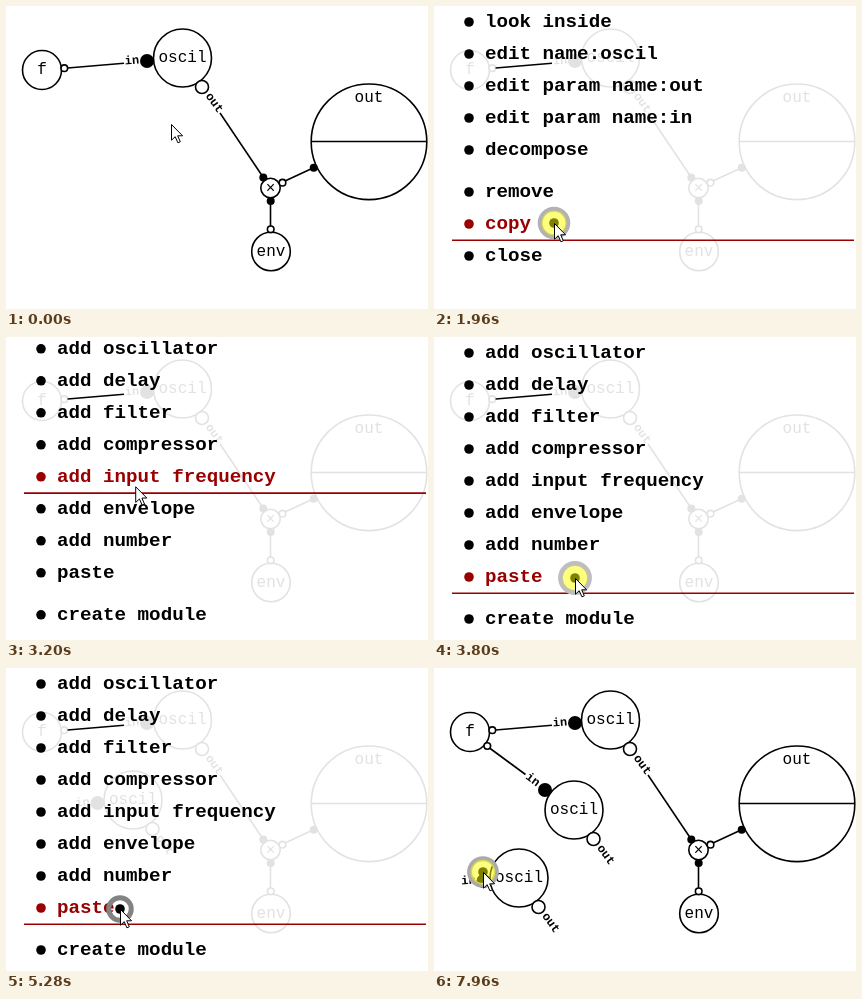
These frames come from a looping animation (422x303 px, 8000 ms). An HTML page:

```html
<!DOCTYPE html>
<html lang="en">
<head>
<meta charset="utf-8">
<title>Patch editor</title>
<style>
html, body { margin: 0; width: 100%; height: 100%; overflow: hidden; background: #fff; }
svg { display: block; width: 100%; height: 100%; font-family: "Courier New", "Liberation Mono", monospace; }
.shape { stroke: #000; stroke-width: 1.6; fill: #fff; }
.dot { fill: #000; }
.label { font-size: 16px; text-anchor: middle; }
.small { font-size: 12px; font-weight: bold; text-anchor: middle; }
.item { font-size: 19.2px; font-weight: bold; }
</style>
</head>
<body>
<svg id="stage" viewBox="0 0 422 303"></svg>
<script>
const LOOP = 8000;
const stage = document.getElementById('stage');

function add(parent, tag, attrs = {}, text) {
  const el = document.createElementNS('http://www.w3.org/2000/svg', tag);
  for (const key in attrs) el.setAttribute(key, attrs[key]);
  if (text) el.textContent = text;
  parent.appendChild(el);
  return el;
}
const group = parent => add(parent, 'g');
const circle = (p, cx, cy, r, cls = 'shape') => add(p, 'circle', { cx, cy, r, class: cls });
const line = (p, x1, y1, x2, y2) => add(p, 'line', { x1, y1, x2, y2, class: 'shape' });
const label = (p, x, y, text) => add(p, 'text', { x, y: y + 4, class: 'label' }, text);
const small = (p, x, y, angle, text) =>
  add(p, 'text', { class: 'small', y: 3, transform: `translate(${x} ${y}) rotate(${angle})` }, text);
const show = (el, on) => el.setAttribute('visibility', on ? 'visible' : 'hidden');
const place = (el, x, y) => el.setAttribute('transform', `translate(${x} ${y})`);
const clamp = v => Math.max(0, Math.min(1, v));
const mix = (a, b, k) => a + (b - a) * k;

// Oscillator module, drawn around its own centre
function oscillator(parent) {
  const root = group(parent);
  const input = group(root);
  small(input, -50.5, 3, -5, 'in');
  circle(input, -35.5, 3, 7, 'dot');
  circle(root, 0, 0, 29);
  label(root, 0, 0, 'oscil');
  circle(root, 19.5, 29, 6.5);
  small(root, 31.5, 45, 54, 'out');
  return { root, input };
}

// Patch
const patch = group(stage);
line(patch, 214, 107, 257, 171);
line(patch, 279, 175, 307, 162);
line(patch, 264.5, 195, 264.5, 221);
circle(patch, 36, 64, 19.5);
label(patch, 36, 64, 'f');
circle(patch, 58.3, 62.2, 3.3);
place(oscillator(patch).root, 176.5, 52);
circle(patch, 363, 135.8, 57.8);
line(patch, 305, 135.5, 421, 135.5);
label(patch, 363, 91.5, 'out');
circle(patch, 264.5, 182, 9.7);
label(patch, 264.5, 182.5, '×');
circle(patch, 257.3, 171.5, 4, 'dot');
circle(patch, 276.5, 176.7, 3.3);
circle(patch, 307.7, 161.7, 4, 'dot');
circle(patch, 264.7, 195, 4, 'dot');
circle(patch, 265, 245.5, 19.3);
label(patch, 265, 245.5, 'env');
circle(patch, 264.7, 223.3, 3.3);

const copyA = oscillator(patch);
const copyB = oscillator(patch);
const link = group(patch);
line(link, 55.5, 80, 91.5, 106.5);
circle(link, 53.3, 78, 3.3);
small(link, 98.5, 112, 37, 'in');
circle(link, 111, 122, 7, 'dot');

line(stage, 61.6, 62, 118, 57.3);

// Menus
const RED = '#900';
function menu(items, gapAt) {
  const root = group(stage);
  const rows = items.map((text, i) => {
    const y = 15 + 32 * i + (i >= gapAt ? 10 : 0);
    const el = group(root);
    circle(el, 35, y + 1, 4.8, '');
    add(el, 'text', { x: 51, y: y + 6, class: 'item' }, text);
    return { y, el };
  });
  const rule = add(root, 'line', { x1: 18, x2: 420, stroke: RED, 'stroke-width': 1.6 });
  return { root, rows, rule };
}
const moduleMenu = menu(['look inside', 'edit name:oscil', 'edit param name:out',
  'edit param name:in', 'decompose', 'remove', 'copy', 'close'], 5);
const canvasMenu = menu(['add oscillator', 'add delay', 'add filter', 'add compressor',
  'add input frequency', 'add envelope', 'add number', 'paste', 'create module'], 8);
const sessions = [
  { menu: moduleMenu, open: 640, close: 2060 },
  { menu: canvasMenu, open: 2990, close: 3960 },
  { menu: canvasMenu, open: 4640, close: 5420 }
];

// Pointer
const ring = group(stage);
const halo = add(ring, 'circle', { fill: 'none', 'stroke-width': 5 });
circle(ring, 0, 0, 4.8, 'dot');
const glow = add(stage, 'circle', { r: 12.5, fill: '#ff0', opacity: 0.5 });
const cursor = add(stage, 'path', {
  d: 'M.5 .5V16.2L4.2 12.7L6.9 18.8L9.3 17.8L6.7 11.8H11.6Z',
  fill: '#fff', stroke: '#000', 'stroke-width': 1
});

// time, x, y, and 1 for a straight unhurried segment
const path = [
  [0, 165, 118], [120, 165, 118], [480, 174, 69], [1160, 174, 69],
  [1240, 174, 79, 1], [1400, 172, 112, 1], [1760, 120, 217], [2080, 120, 217],
  [2600, 127, 132], [3060, 127, 132], [3620, 141, 241], [3980, 141, 241],
  [4380, 85, 210], [4720, 85, 210], [5060, 114, 241], [5440, 114, 241],
  [5860, 127, 132], [5940, 127, 132], [6100, 140, 142], [6340, 38, 72],
  [6400, 38, 72], [6520, 63, 105, 1], [6600, 84, 125, 1], [6860, 146, 158, 1],
  [6980, 146, 158], [7300, 36, 68], [7460, 36, 68], [7600, 42, 94, 1],
  [7860, 49, 204, 1], [8000, 49, 204]
];
// button down, button up
const presses = [[500, 760], [1215, 1400], [1900, 1990], [2785, 3040], [3762, 3880],
  [4440, 4690], [5130, 5250], [5920, 6110], [6350, 6960], [7340, 7800], [7885, 8000]];
const SHRINK = 250, LAG = 80;

function pointer(t) {
  t = Math.max(0, t);
  const i = Math.max(1, path.findIndex(p => p[0] > t));
  const a = path[i - 1], b = path[i];
  let k = (t - a[0]) / (b[0] - a[0]);
  if (!b[3]) k = k * k * (3 - 2 * k);
  return [mix(a[1], b[1], k), mix(a[2], b[2], k)];
}

function drawMenus(t, y) {
  show(moduleMenu.root, false);
  show(canvasMenu.root, false);
  let fade = 0;
  for (const s of sessions) {
    if (t < s.open || t >= s.close + 120) continue;
    const k = clamp((t - s.open) / 320);
    const alpha = Math.min(clamp((t - s.open) / 180), 1 - clamp((t - s.close) / 120));
    fade = alpha;
    show(s.menu.root, true);
    s.menu.root.setAttribute('opacity', alpha);
    place(s.menu.root, 0, -36 * (1 - k) ** 2);
    let hot = null;
    for (const row of s.menu.rows) {
      const on = Math.abs(y - row.y) <= 16;
      row.el.setAttribute('fill', on ? RED : '#000');
      if (on) hot = row;
    }
    s.menu.rule.setAttribute('opacity', hot ? 1 : 0);
    if (hot) {
      s.menu.rule.setAttribute('y1', hot.y + 17.3);
      s.menu.rule.setAttribute('y2', hot.y + 17.3);
    }
  }
  patch.setAttribute('opacity', 1 - 0.89 * fade);
}

function drawPointer(t, x, y) {
  place(cursor, x, y);
  place(glow, x, y);
  const press = presses.find(([down, up]) => t >= down && t < Math.max(up, down + SHRINK));
  show(ring, press);
  show(glow, press && t < press[1]);
  if (!press) return;
  const k = clamp((t - press[0]) / SHRINK);
  const grey = Math.round(mix(210, 80, k));
  place(ring, ...pointer(t - LAG));
  halo.setAttribute('r', mix(15.5, 8.5, k));
  halo.setAttribute('stroke', `rgb(${grey},${grey},${grey})`);
}

function draw(t) {
  const [x, y] = pointer(t);
  const drag = clamp((t - 5940) / 160);
  const slide = drag * drag * (3 - 2 * drag);
  const linked = t >= 6960;
  place(copyA.root, mix(127, 140, slide), mix(132, 142, slide));
  place(copyB.root, 85, 210);
  copyA.root.setAttribute('display', t >= 3960 ? 'inline' : 'none');
  copyB.root.setAttribute('display', t >= 5420 ? 'inline' : 'none');
  copyA.input.setAttribute('display', linked ? 'none' : 'inline');
  show(link, linked);
  drawMenus(t, y);
  drawPointer(t, x, y);
}

const start = performance.now();
function tick() {
  draw((performance.now() - start) % LOOP);
  requestAnimationFrame(tick);
}
tick();
</script>
</body>
</html>
```
